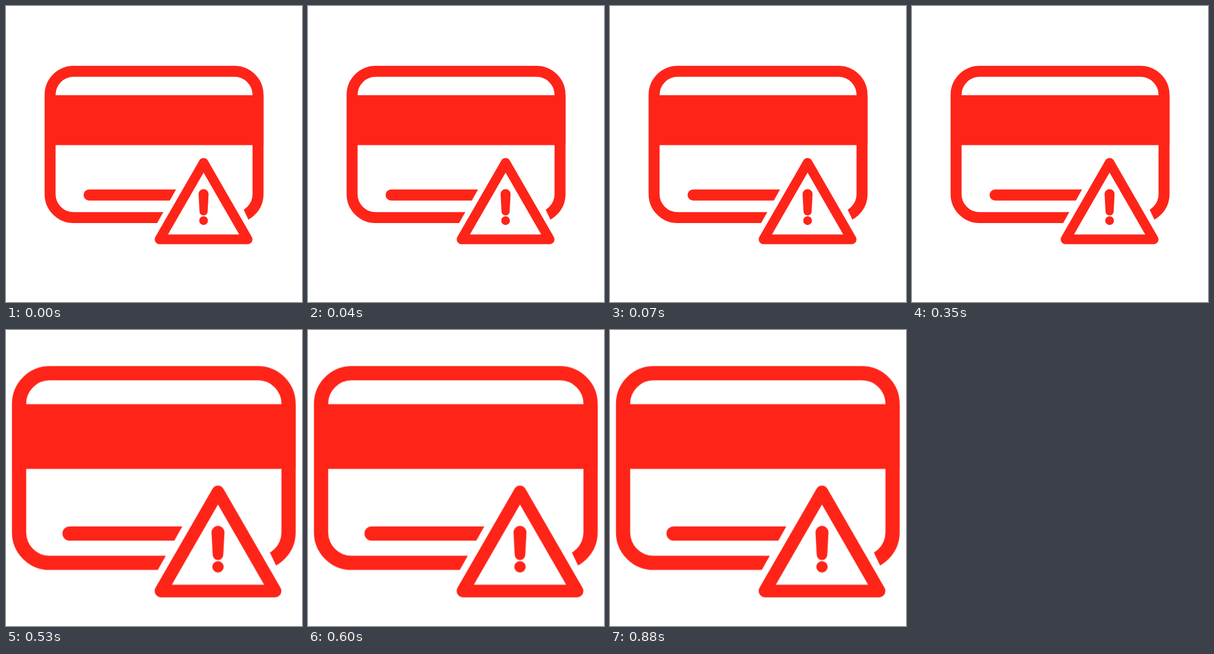
Write an HTML page that moves like this. It is 480 px wide and 480 px high and loops after 1.07 s.

```html
<!DOCTYPE html>
<html lang="en">
<head>
<meta charset="utf-8">
<title>Card alert</title>
<style>
  html, body { margin: 0; width: 100%; height: 100%; overflow: hidden; background: #fff; }
  svg { display: block; width: 100vw; height: 100vh; }
  .icon { --red: #fe2418; animation: pulse 1070ms step-end infinite; }
  .fill { fill: var(--red); }
  .line { fill: none; stroke: var(--red); stroke-width: 17.8; stroke-linecap: round; }
  .sign { fill: #fff; stroke: var(--red); stroke-width: 15.8; stroke-linejoin: round; }
  /* The icon jumps between two sizes: 530 ms small, 540 ms large. */
  @keyframes pulse {
    0% { transform: none; }
    49.533%, 100% { transform: translate(-71.5px, -67.2px) scale(1.296); }
  }
</style>
</head>
<body>
<svg viewBox="0 0 480 480">
  <g class="icon">
    <rect class="line" x="71.5" y="105.9" width="337.2" height="237.3" rx="38.3"/>
    <rect class="fill" x="63" y="144.6" width="354.4" height="81"/>
    <path class="line" d="M134.7 306.5H300"/>
    <!-- gap between card and sign -->
    <path fill="#fff" d="M293 267L240 361H400L355.8 268Z"/>
    <path class="sign" d="M320.4 254.4L249 378.4H391.8Z"/>
    <path class="fill" d="M312.3 305a8.1 8.1 0 0 1 16.2 0L327 333a6.6 6.6 0 0 1-13.2 0Z"/>
    <circle class="fill" cx="320.4" cy="348.1" r="7.1"/>
  </g>
</svg>
</body>
</html>
```
